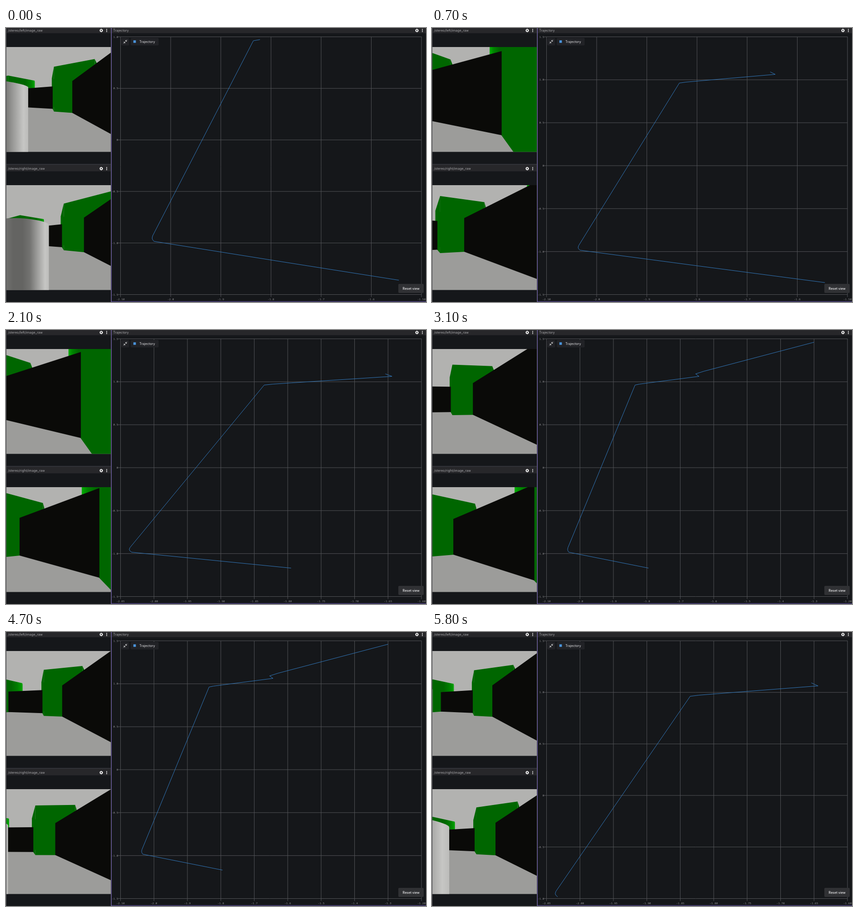
Animation, 926 px wide and 605 px high, one loop 6 s. Source, as an HTML page with a canvas:

```html
<!DOCTYPE html>
<html lang="en">
<head>
<meta charset="utf-8">
<title>Stereo trajectory</title>
<style>
html, body { margin: 0; width: 100%; height: 100%; overflow: hidden; background: #15171a; }
canvas { display: block; }
</style>
</head>
<body>
<canvas id="stage" width="926" height="605"></canvas>
<script>
const ctx = document.getElementById('stage').getContext('2d');
const LOOP = 6000;
const UI = '7.2px Inter, sans-serif';
const MONO = '6px "Noto Sans Mono", "DejaVu Sans Mono", monospace';
const rad = deg => deg * Math.PI / 180;
const gray = v => `rgb(${v},${v},${v - 2})`;

function box(fill, x, y, w, h) {
  ctx.fillStyle = fill;
  ctx.fillRect(x, y, w, h);
}

function poly(fill, pts) {
  ctx.beginPath();
  pts.forEach(p => ctx.lineTo(...p));
  ctx.fillStyle = fill;
  ctx.fill();
}

function line(color, width, pts) {
  ctx.beginPath();
  pts.forEach(p => ctx.lineTo(...p));
  ctx.strokeStyle = color;
  ctx.lineWidth = width;
  ctx.stroke();
}

function ramp(x0, x1, stops) {
  const g = ctx.createLinearGradient(x0, 0, x1, 0);
  stops.forEach(([at, color]) => g.addColorStop(at, color));
  return g;
}

// ---- arena: black hexagon walls, a green block at each corner, one drum --
// Plan units are wall heights; heights are measured from the lens.
const FOCAL = 115.5 / Math.tan(rad(40)), CX = 116, HORIZON = 157.4, NEAR = 0.05;
const FLOOR = -0.427, WALL_TOP = 0.573, BLOCK_TOP = 1.13, DRUM_TOP = 0.19;
const SIDE = 3.01, CENTER = [-2.607, -0.885], CORNERS = [-30, 30, 90];
const LIGHT = [0.8, 0.6], DRUM_RADIUS = 0.29;

const cameras = [
  { at: [-0.765, -1.85], dy: 0, drum: { bearing: -30.5, dist: 1.15 } },
  { at: [-0.83, -1.765], dy: 305, drum: { bearing: -22.6, dist: 1 } }
];

// Robot poses: left yaw, right yaw, drum drift, in degrees
const poses = [
  [-10.1, -3.1, 0], [-68.75, -43.3, -5], [-64.4, -57.2, -5], [-33.1, -51.8, -5],
  [-22, -32.6, -5], [-16.4, -23.9, -5], [-15.4, -15.3, -8.5]
];
// Camera updates on the way from each pose to the next
const updates = [
  [300, 400, 500, 600, 700], [1000, 1300, 1400, 1500], [2600, 2800, 2900, 3100],
  [3300, 3400, 3700], [4700, 5100], [5400, 5500, 5800]
];

function poseAt(t, side) {
  for (let i = 0; i < updates.length; i++) {
    const steps = side && i === 2 ? updates[i].slice(-1) : updates[i];
    const k = steps.filter(s => s <= t).length / steps.length;
    if (k < 1) return poses[i].map((v, j) => v + (poses[i + 1][j] - v) * k);
  }
  return poses[poses.length - 1];
}

// Point at a hexagon corner: `inner` towards the centre, `across` sideways
function atCorner(deg, inner, across) {
  const c = Math.cos(rad(deg)), s = Math.sin(rad(deg));
  return [CENTER[0] + (SIDE - inner) * c + across * s, CENTER[1] + (SIDE - inner) * s - across * c];
}

function toCamera([p, a], { at, yaw }) {
  const dp = p - at[0], da = a - at[1], s = Math.sin(yaw), c = Math.cos(yaw);
  return [da * s + dp * c, da * c - dp * s];
}

const screenX = ([x, z]) => CX + FOCAL * x / Math.max(z, NEAR);
const project = (v, h) => [screenX(v), HORIZON - FOCAL * h / Math.max(v[1], NEAR)];

function clipNear(a, b) {
  if (a[1] >= NEAR) return a;
  const k = (NEAR - a[1]) / (b[1] - a[1]);
  return [a[0] + (b[0] - a[0]) * k, NEAR];
}

function upright(fill, from, to, top, cam) {
  const a = toCamera(from, cam), b = toCamera(to, cam);
  if (a[1] < NEAR && b[1] < NEAR) return;
  const u = clipNear(a, b), v = clipNear(b, a);
  poly(fill, [project(u, FLOOR), project(u, top), project(v, top), project(v, FLOOR)]);
}

const joint = (deg, side) => atCorner(deg, 0.31, side * 0.537);

function drawBlock(deg, cam) {
  const green = lum => `rgb(0,${Math.round(102 + 90 * lum)},0)`;
  for (const side of [-1, 1]) {
    const facing = side * (LIGHT[0] * Math.sin(rad(deg)) - LIGHT[1] * Math.cos(rad(deg)));
    const lum = Math.max(0, facing - 0.15);
    const outer = atCorner(deg, 0, side * 1.07);
    const shade = ramp(screenX(toCamera(outer, cam)), screenX(toCamera(joint(deg, side), cam)),
      [[0, green(lum)], [0.35, green(lum * 0.4)], [0.8, green(0)]]);
    upright(green(lum), atCorner(deg, -0.29, side * 1.03), outer, BLOCK_TOP, cam);
    upright(lum ? shade : green(0), outer, atCorner(deg, 0.63, 0), BLOCK_TOP, cam);
  }
}

function drawDrum({ yaw, drum }, drift) {
  const mid = rad(drum.bearing + drift) + yaw;
  if (mid < rad(-65)) return;
  const half = Math.asin(DRUM_RADIUS / drum.dist), sweep = Math.PI / 2 - half;
  const rim = [];
  for (let k = -1; k <= 1.001; k += 0.1) {
    const turn = mid + Math.PI + k * sweep;
    rim.push(project([
      drum.dist * Math.sin(mid) + DRUM_RADIUS * Math.sin(turn),
      drum.dist * Math.cos(mid) + DRUM_RADIUS * Math.cos(turn)
    ], DRUM_TOP));
  }
  const right = rim[0][0], left = rim[rim.length - 1][0];
  const tones = [[0, 188], [0.08, 198], [0.25, 155], [0.4, 115], [0.55, 100], [0.75, 100], [1, 120]];
  poly(ramp(right, left, tones.map(([at, v]) => [at, gray(v)])), [...rim, [left, 275], [right, 275]]);
}

function drawView(side, t) {
  const pose = poseAt(t, side);
  const cam = { ...cameras[side], yaw: rad(pose[side]) };
  ctx.save();
  ctx.translate(0, cam.dy);
  ctx.beginPath();
  ctx.rect(1, 42, 230, 231.5);
  ctx.clip();
  box(gray(178), 0, 42, 232, 116);
  box(gray(156), 0, 158, 232, 116);
  [...CORNERS].reverse().forEach(deg => drawBlock(deg, cam));
  for (const deg of [30, -30]) upright('#0a0a08', joint(deg, 1), joint(deg - 60, -1), WALL_TOP, cam);
  upright('#0a0a08', joint(90, 1), joint(30, -1), WALL_TOP, cam);
  drawDrum(cam, pose[2]);
  ctx.restore();
}

// ---- trajectory chart ---------------------------------------------------
const path = [
  [-1.545, -1.361], [-1.795, -1.169], [-2.0334, -0.984], [-2.0361, -0.967], [-2.037, -0.953],
  [-2.036, -0.931], [-1.8352, 0.962], [-1.822, 0.973], [-1.795, 0.987],
  [-1.644, 1.063], [-1.654, 1.092], [-1.629, 1.123], [-1.3, 1.4605]
];
const charts = [
  { at: 0, x: [-2.1, -1.5, 0.1], y: [-1.5, 1], part: [0, 8] },
  { at: 500, x: [-2.1, -1.5, 0.1], y: [-1.5, 1.5], part: [0, 11] },
  { at: 2100, x: [-2.05, -1.6, 0.05], y: [-1.5, 1.5], part: [1, 11] },
  { at: 2600, x: [-2.1, -1.2, 0.1], y: [-1.5, 1.5], part: [1, 13] },
  { at: 4900, x: [-2.05, -1.6, 0.05], y: [-1, 1.5], part: [2, 11] }
];
const plot = { x: 252.5, y: 19.5, w: 663.5, h: 569 };

function text(str, x, y, color, font, align = 'left') {
  ctx.font = font;
  ctx.fillStyle = color;
  ctx.textAlign = align;
  ctx.fillText(str, x, y);
}

function drawChart({ x: [x0, x1, dx], y: [y0, y1], part }) {
  const sx = v => plot.x + (v - x0) / (x1 - x0) * plot.w;
  const sy = v => plot.y + (y1 - v) / (y1 - y0) * plot.h;
  const grid = '#535458', label = '#929295';

  const nx = Math.round((x1 - x0) / dx), ny = Math.round((y1 - y0) / 0.5);
  for (let i = 0; i <= nx; i++) {
    const v = x0 + i * dx, x = sx(v);
    line(grid, 1, [[x, 19], [x, 594]]);
    text(v.toFixed(i % nx === 0 || dx < 0.1 ? 2 : 1), x, 601.3, label, MONO, 'center');
  }
  for (let i = 0; i <= ny; i++) {
    const v = y0 + i * 0.5, y = sy(v);
    line(grid, 1, [[247, y], [916, y]]);
    text(v ? v.toFixed(1) : '0', 247.3, y + 2.1, label, MONO, 'right');
  }
  ctx.lineJoin = 'round';
  line('#3279bd', 1, path.slice(...part).map(([a, b]) => [sx(a), sy(b)]));
}

// ---- panel frames -------------------------------------------------------
function roundBox(fill, x, y, w, h) {
  ctx.beginPath();
  ctx.roundRect(x, y, w, h, 2);
  ctx.fillStyle = fill;
  ctx.fill();
}

function ring(x, y, r, width, dash) {
  ctx.beginPath();
  ctx.arc(x, y, r, 0, Math.PI * 2);
  ctx.setLineDash(dash);
  ctx.strokeStyle = '#fff';
  ctx.lineWidth = width;
  ctx.stroke();
  ctx.setLineDash([]);
}

function header(title, x, y, w) {
  const right = x + w;
  box('#27272a', x, y - 9, w, 15);
  text(title, x + 3.2, y + 2.3, '#a9a9ac', UI);
  ring(right - 21, y, 2.3, 1.7, []);
  ring(right - 21, y, 3.3, 1, [1.8, 1.655]);
  for (const d of [-2.5, 0, 2.5]) {
    ctx.beginPath();
    ctx.arc(right - 9, y + d, 0.9, 0, Math.PI * 2);
    ctx.fillStyle = '#fff';
    ctx.fill();
  }
}

function drawOverlay() {
  roundBox('#212226', 254, 22, 17.5, 16.5);
  for (const s of [1, -1]) {
    ctx.save();
    ctx.translate(263, 30.2);
    ctx.scale(s, s);
    line('#fff', 0.9, [[0.9, -0.9], [4, -4]]);
    line('#fff', 0.9, [[0.9, -3.6], [0.9, -0.9], [3.6, -0.9]]);
    ctx.restore();
  }
  roundBox('#212226', 275, 22, 61.5, 16.5);
  box('#4a93da', 280.8, 27.2, 5.6, 5.6);
  text('Trajectory', 294, 32.8, '#e4e4e6', UI);
  roundBox('#303134', 865, 565, 56, 20);
  text('Reset view', 893.2, 577.8, '#f0f0f2', '500 ' + UI, 'center');
}

function drawBorders() {
  const edge = '#4b4b51', active = '#6f5cb4';
  box(edge, 0, 0, 1, 605);
  box(edge, 0, 300.5, 231, 1);
  box(edge, 231, 0, 1, 605);
  box(active, 232, 0, 1, 605);
  box(active, 232, 603.5, 694, 1);
}

function draw(t) {
  box('#15171a', 0, 0, 926, 605);
  header('/stereo/left/image_raw', 1, 5.5, 230);
  header('/stereo/right/image_raw', 1, 310.5, 230);
  header('Trajectory', 233, 5.5, 694);
  drawView(0, t);
  drawView(1, t);
  drawChart(charts.findLast(c => c.at <= t));
  drawOverlay();
  drawBorders();
}

const start = performance.now();
function tick() {
  draw((performance.now() - start) % LOOP);
  requestAnimationFrame(tick);
}
tick();
</script>
</body>
</html>
```
